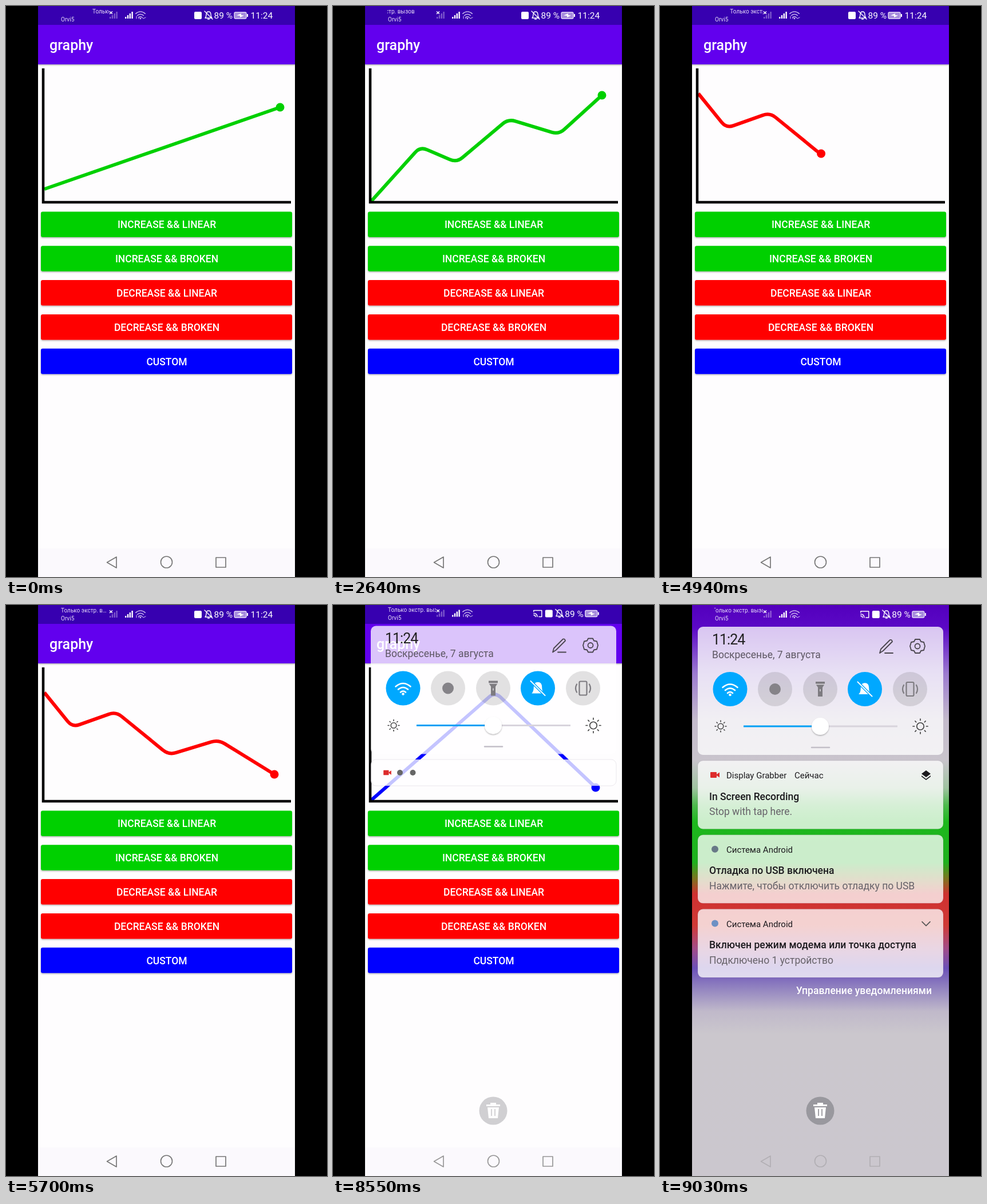
An HTML page for the animation above (9.06 s loop, 561 by 998 pixels).

```html
<!DOCTYPE html>
<html lang="ru">
<head>
<meta charset="utf-8">
<style>
html, body { margin: 0; width: 100%; height: 100%; overflow: hidden; background: #000; }
svg { display: block; font-family: Roboto, "Noto Sans", sans-serif; }
.medium { font-weight: 500; }
.line { fill: none; stroke-linecap: round; stroke-linejoin: round; }
</style>
</head>
<body>
<svg width="561" height="998" viewBox="0 0 561 998">
  <defs>
    <clipPath id="screen"><rect x="56" width="449" height="998"/></clipPath>
    <clipPath id="carrier"><rect x="95" width="85" height="32"/></clipPath>
    <linearGradient id="blur" gradientUnits="userSpaceOnUse" x1="0" y1="0" x2="0" y2="998"></linearGradient>
    <filter id="shadow" x="-5%" y="-15%" width="110%" height="140%">
      <feDropShadow dx="0" dy="1.5" stdDeviation="1.2" flood-opacity=".3"/>
    </filter>
    <g id="wifi" class="line">
      <path d="M-13-4Q0-15 13-4M-8.500 1Q0-6 8.500 1M-4.500 6Q0 2 4.500 6"/><circle cy="9" r="1"/>
    </g>
    <path id="bell" d="M-6 5Q-4 3-4-1Q-4-6 0-6Q4-6 4-1Q4 3 6 5ZM-1.500 7H1.500M-7-7L7 7"/>
    <g id="sun" class="line" stroke="#444">
      <circle r="4.800"/>
      <path d="M0-8V-10M0 8V10M-8 0H-10M8 0H10M5.700-5.700L7-7M-5.700-5.700L-7-7M5.700 5.700L7 7M-5.700 5.700L-7 7"/>
    </g>
    <g id="camera" fill="#dd2c2c"><rect x="-8" y="-5" width="11" height="10" rx="1"/><path d="M3-1L8-4.500V4.500L3 1Z"/></g>
  </defs>

  <g clip-path="url(#screen)">
    <rect x="56" width="449" height="998" fill="#fefdfe"/>
    <rect x="56" y="948" width="449" height="50" fill="#fbf9fd"/>
    <rect x="56" y="33" width="449" height="69" fill="#6200ee" filter="url(#shadow)"/>
    <rect x="56" width="449" height="33" fill="#3700b0"/>
    <text class="medium" x="76" y="77" font-size="25" fill="#fff">graphy</text>

    <path id="plot" fill="none" stroke-width="6"/>
    <path d="M65 109V343H498" fill="none" stroke="#000" stroke-width="4.500"/>
    <circle id="dot" r="7.500"/>
    <g id="buttons" class="medium" font-size="17.500" text-anchor="middle"></g>

    <rect id="scrim" x="56" width="449" height="998" fill="url(#blur)"/>

    <g id="nav" class="line" stroke="#777" stroke-width="1.700">
      <path d="M193 963V982L176.500 972.500ZM367 964H384V981H367Z"/><circle cx="280.500" cy="972" r="10"/>
    </g>

    <g id="status" fill="#fff">
      <g clip-path="url(#carrier)" font-size="10" fill="#e6dcf8">
        <text id="notice" y="13"></text><text id="notice2" y="13">Только экстр. вызов</text>
      </g>
      <text x="96" y="27" font-size="10" fill="#e6dcf8">Orvi5</text>
      <path d="M181 9.500L186 14M186 9.500L181 14" stroke="#fff" stroke-width="1.500"/>
      <g id="bars"></g>
      <use href="#wifi" transform="translate(235 16)scale(.65)" stroke="#d8c8f4" stroke-width="2"/>
      <path d="M228 18V22M232 19V22M238 20L240 22L244 20" class="line" stroke="#d8c8f4"/>
      <g id="icons">
        <g id="cast" class="line" stroke="#fff" stroke-width="1.500">
          <path d="M309 13V11H323V22H318M309 16Q315 16 315 22M309 19Q312 19 312 22"/>
        </g>
        <rect x="329" y="10" width="13" height="13" rx="2"/>
        <use href="#bell" x="354" y="16" class="line" stroke="#fff" stroke-width="1.400"/>
        <text x="363.500" y="22" font-size="15.500">89 %</text>
        <rect x="399" y="11" width="21" height="11" rx="2" fill="#a58bdc" stroke="#e8def9" stroke-width="1.300"/>
        <path d="M422 14V19" stroke="#fff" stroke-width="2"/>
        <path d="M403 16.500L411 13V16L416 16.500L409 20V17Z"/>
      </g>
      <text id="clock" x="427.500" y="22" font-size="15.500">11:24</text>
    </g>

    <g id="shade">
      <g id="panel">
        <rect x="66" y="38" width="429" height="224" rx="9" fill="#fff" fill-opacity=".77"/>
        <text x="91" y="68.500" font-size="25" letter-spacing="-1" fill="#222">11:24</text>
        <text x="91" y="92.500" font-size="17.500" fill="#5d5763">Воскресенье, 7 августа</text>
        <g class="line" stroke="#4a464e" stroke-width="1.800">
          <path d="M384 84L386 77L402 61Q405 60 406 64L390 80ZM393 84H407"/>
          <path d="M446 60H454L456 64L461 65L463 72L461 79L456 80L454 84H446L444 80L439 79L437 72L439 65L444 64Z"/>
          <circle cx="450" cy="72" r="4.500"/>
        </g>
        <g id="toggles"></g>
        <use href="#wifi" x="122.500" y="148" stroke="#fff" stroke-width="2.600"/>
        <circle cx="201" cy="147" r="10" fill="#858388"/>
        <path d="M272 134H288V138L284 144V160H276V144L272 138Z" fill="#7d7b80"/>
        <path d="M272 138.500H288M280 147V151" stroke="#dddbe0" stroke-width="1.500"/>
        <g transform="translate(358 147)scale(1.800)" stroke-linecap="round">
          <use href="#bell" fill="#fff"/><path d="M-7-7L7 7" stroke="#00a8ff" stroke-width="2.500"/>
          <path d="M-7-7L7 7" stroke="#fff" stroke-width="1.100"/>
        </g>
        <g class="line" stroke="#7d7b80" stroke-width="2.200">
          <rect x="430.500" y="135" width="13" height="24" rx="2"/>
          <path d="M426 140Q422 147 426 154M448 140Q452 147 448 154"/>
        </g>
        <use href="#sun" x="106" y="212" stroke-width="1.600"/>
        <use href="#sun" transform="translate(455 212)scale(1.300)" stroke-width="1.300"/>
        <path d="M280 212H415" stroke="#d8d4dc" stroke-width="3"/>
        <path d="M146 212H280" stroke="#00a0f5" stroke-width="3"/>
        <circle cx="280" cy="212" r="15" fill="#fff" filter="url(#shadow)"/>
        <path d="M265 249H296" stroke="#c3bfc8" stroke-width="2.500" stroke-linecap="round"/>
      </g>
      <g id="cards"></g>
      <g id="mini">
        <use href="#camera" transform="translate(95 293)scale(.85)"/>
        <circle cx="117" cy="293" r="5" fill="#666"/><circle cx="139.500" cy="293" r="5" fill="#666"/>
      </g>
      <text id="manage" class="medium" x="475" y="680" font-size="17.500" fill="#fff" text-anchor="end">Управление уведомлениями</text>
      <g id="trash">
        <circle cx="280" cy="884" r="24.500" fill="#99989e"/>
        <path d="M268 873H292V876H268ZM275 870H285V873H275ZM270 878H290L288 897H272Z" fill="#fff"/>
        <path d="M277 881V893M283 881V893" stroke="#99989e" stroke-width="1.800"/>
      </g>
    </g>
  </g>
</svg>
<script>
const $ = id => document.getElementById(id);
const set = (el, attrs) => { for (const k in attrs) el.setAttribute(k, attrs[k]); };
const clamp = v => Math.min(1, Math.max(0, v));
const mix = (a, b, k) => a + (b - a) * k;
const smooth = k => k * k * (3 - 2 * k);
const LOOP = 9060, DRAW = 1150, OPEN = 8480;
const GREEN = '#00d000', RED = '#ff0000', BLUE = '#0000ff';

const graphs = [
  { start: -2000, color: GREEN, points: [[67, 320], [479, 177]] },
  { start: 757, color: GREEN, points: [[67, 341], [152.5, 246], [216, 273.5], [306.5, 197.5], [394.5, 224.5], [470, 156]] },
  { start: 2690, color: RED, points: [[67, 153], [479, 295]] },
  { start: 4550, color: RED, points: [[67, 153], [116, 213.5], [192, 186.5], [284.5, 262], [371, 235.5], [469, 296]] },
  { start: 6625, color: BLUE, points: [[67, 341], [283, 152], [459, 319]] }
];

// Polyline with its corners softened over r pixels on each side.
function roundedPath(points, r = 13) {
  const toward = (a, b) => {
    const k = r / Math.hypot(b[0] - a[0], b[1] - a[1]);
    return [mix(a[0], b[0], k), mix(a[1], b[1], k)];
  };
  let d = 'M' + points[0];
  for (let i = 1; i < points.length - 1; i++)
    d += `L${toward(points[i], points[i - 1])}Q${points[i]} ${toward(points[i], points[i + 1])}`;
  return d + 'L' + points.at(-1);
}
graphs.forEach(g => g.path = roundedPath(g.points));

const labels = [['INCREASE && LINEAR', GREEN], ['INCREASE && BROKEN', GREEN],
  ['DECREASE && LINEAR', RED], ['DECREASE && BROKEN', RED], ['CUSTOM', BLUE]];
$('buttons').innerHTML = labels.map(([label, color], i) => {
  const y = 359.5 + i * 59.8;
  return `<rect x="61" y="${y}" width="439" height="44.500" rx="3" fill="${color}" filter="url(#shadow)"/>
    <text x="281" y="${y + 28.8}" fill="#fff">${label.replaceAll('&', '&amp;')}</text>`;
}).join('');

$('bars').innerHTML = [181, 208].map((x, n) => [0, 1, 2, 3].map(i =>
  `<rect x="${x + i * 3.8}" y="${19 - i * 3}" width="2.400" height="${3 + i * 3}" opacity="${n ? 1 : .35}"/>`).join('')).join('');

$('toggles').innerHTML = [122.5, 201, 280, 358, 437].map((x, i) =>
  `<circle cx="${x}" cy="147" r="30" fill="${i % 3 ? '#000' : '#00a8ff'}" fill-opacity="${i % 3 ? .115 : 1}"/>`).join('');

const stops = [[0, '#5300bd'], [40, '#5b08c6'], [120, '#9c7bd0'], [200, '#c3bacb'], [270, '#c9c4cc'],
  [320, '#9fc3a0'], [350, '#4dba4d'], [380, '#1db81d'], [450, '#1eb01e'], [478, '#7c7420'], [505, '#cf3030'],
  [560, '#d03a36'], [600, '#a34c88'], [635, '#6b50b8'], [665, '#8d7dbf'], [710, '#c0b9ca'], [750, '#cbc7cd'], [998, '#cbc7ce']];
$('blur').innerHTML = stops.map(([y, c]) => `<stop offset="${y / 998}" stop-color="${c}"/>`).join('');

const notes = [
  ['Display Grabber', 'In Screen Recording', 'Stop with tap here.',
    '<use href="#camera" x="96" y="25"/><text x="235" y="31" font-size="15">Сейчас</text><path d="M465 17L473 23L465 29L457 23ZM457 26L465 32L473 26V28L465 34L457 28Z"/>'],
  ['Система Android', 'Отладка по USB включена', 'Нажмите, чтобы отключить отладку по USB',
    '<circle cx="96" cy="25" r="6" fill="#687987"/>'],
  ['Система Android', 'Включен режим модема или точка доступа', 'Подключено 1 устройство',
    '<circle cx="96" cy="25" r="6" fill="#6d91c4"/><path class="line" d="M458 22L465 29L472 22" stroke="#555" stroke-width="1.700"/>']
];
$('cards').innerHTML = notes.map(([app, title, body, extra]) => `<g>
  <rect x="66" width="429" rx="9" fill="#fff" fill-opacity=".77" stroke="#806a90" stroke-opacity=".15"/>
  <g fill="#1c1a1e"><text x="116" y="31" font-size="15">${app}</text>
  <text class="medium" x="86" y="68.500" font-size="17.500">${title}</text>
  <text x="86" y="95" font-size="17.500" fill="#666269">${body}</text>${extra}</g></g>`).join('');
const cards = [...$('cards').children];

function drawGraph(t) {
  const g = graphs.findLast(g => t >= g.start);
  const left = 1 - clamp((t - g.start) / DRAW);
  const plot = $('plot');
  set(plot, { d: g.path, stroke: g.color });
  const total = plot.getTotalLength(), len = total * (1 - left * left);
  const p = plot.getPointAtLength(len);
  set(plot, { 'stroke-dasharray': `${len} ${total + 10}` });
  set($('dot'), { cx: p.x, cy: p.y, fill: g.color });
}

function drawNotice(t) {
  const scrolling = t < 5620, open = t >= OPEN;
  const x = scrolling ? 151 - t * .04 : open ? 96 - Math.max(0, t - 8920) * .04 : 96;
  $('notice').textContent = scrolling || open ? 'Только экстр. вызов' : 'Только экстр. в…';
  set($('notice'), { x });
  set($('notice2'), { x: scrolling ? x + 169 : 600 });
}

function drawShade(t) {
  const open = t >= OPEN;
  const fade = clamp((t - OPEN + 20) / 80);
  const grow = smooth(clamp((t - 8590) / 410));
  const dim = smooth(clamp((t - 8560) / 430));
  const dy = open ? -1.5 * (1 - grow) : 0;
  set($('shade'), { opacity: open ? fade : 0 });
  set($('scrim'), { opacity: dim });
  set($('nav'), { opacity: open ? mix(.75, .3, dim) : 1 });
  set($('status'), { transform: `translate(0 ${dy})` });
  set($('panel'), { transform: `translate(0 ${dy})` });
  set($('icons'), { transform: `translate(${open ? 41.8 : 0} 0)` });
  set($('cast'), { opacity: open ? 1 : 0 });
  set($('clock'), { opacity: open ? 0 : 1 });
  cards.forEach((card, i) => {
    set(card, { transform: `translate(0 ${mix(270, 272 + i * 129.8, grow)})`, opacity: i ? grow : 1 });
    set(card.children[0], { height: mix(46, 119.5, grow) });
    set(card.children[1], { opacity: clamp(grow * 2 - 1) });
  });
  set($('mini'), { opacity: clamp(1 - grow * 2.5) });
  set($('manage'), { opacity: clamp(grow * 2 - 1) });
  set($('trash'), { opacity: mix(.45, 1, dim) });
}

const begin = performance.now();
function frame() {
  const t = (performance.now() - begin) % LOOP;
  drawGraph(t);
  drawNotice(t);
  drawShade(t);
  requestAnimationFrame(frame);
}
frame();
</script>
</body>
</html>
```
